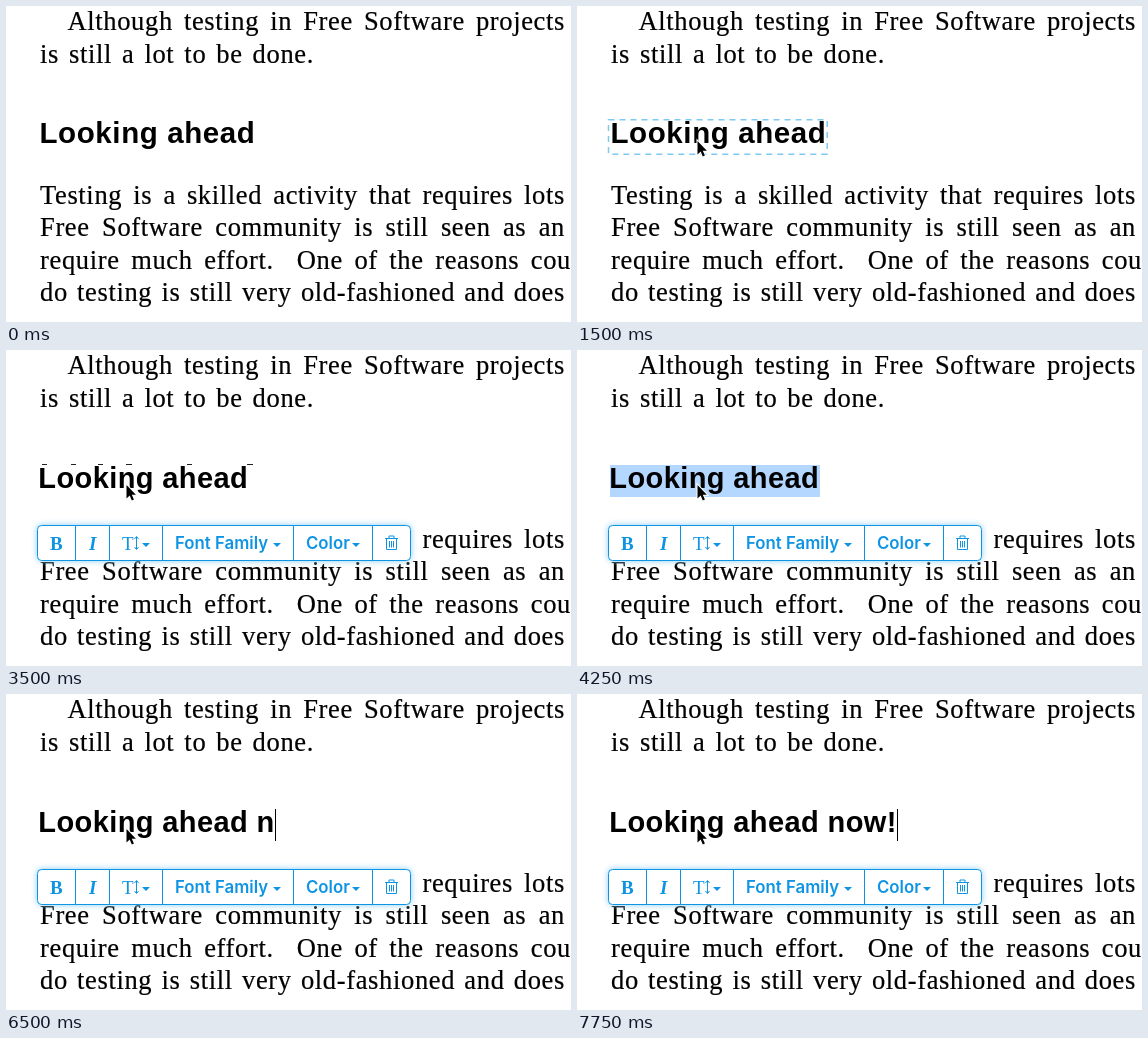
An HTML page for the animation above (8 s loop, 565x316 px).

```html
<!DOCTYPE html>
<html lang="en">
<head>
<meta charset="utf-8">
<title>Editing a heading</title>
<style>
  html, body { margin: 0; width: 100%; height: 100%; overflow: hidden; background: #fff; }
  .body, .head, svg { position: absolute; }
  .body { left: 34px; font: 26.5px/32.3px "Liberation Serif", serif; letter-spacing: .65px;
    word-spacing: -2px; -webkit-text-stroke: .2px; }
  .body p { margin: 0; height: 32.3px; width: 525px; text-align-last: justify; }
  .head { white-space: pre; font: bold 29.5px/27px "Liberation Sans", sans-serif; letter-spacing: .6px; }
  #edited { left: 33px; top: 115px; height: 32px; padding-right: 1px; font-size: 29px; letter-spacing: .4px; }
  #typed { margin-left: -.7px; }
  svg { left: 0; top: 0; }
  .bar { fill: #0e94e3; font: 600 16.8px Inter, sans-serif; }
  .serif { font: bold 19px "Liberation Serif", serif; }
  .line { fill: none; stroke: #0e94e3; }
  .panel { fill: #fff; stroke: #0e94e3; filter: drop-shadow(0 0 3px #8ccdf4); }
</style>
</head>
<body>
<div class="body" style="top:-.6px">
  <p style="text-indent:27.5px">Although testing in Free Software projects</p>
  <p style="width:274px">is still a lot to be done.</p>
</div>
<div class="body" style="top:173.2px">
  <p>Testing is a skilled activity that requires lots</p>
  <p>Free Software community is still seen as an</p>
  <p style="width:531px">require much effort.&nbsp; One of the reasons cou</p>
  <p>do testing is still very old-fashioned and does</p>
</div>

<div id="heading" class="head" style="left:33.5px; top:113px">Looking ahead</div>
<div id="edited" class="head"><span id="typed"></span></div>

<svg width="565" height="316" viewBox="0 0 565 316">
  <path id="hover" d="M31.5 113.8H250.2V148.2H31.5Z" fill="none" stroke="#7ccaf2" stroke-width="1.5" stroke-dasharray="6 5"/>
  <path id="specks" d="M36 114.5h5M65 114.5h5M92 114.5h5M120 114.5h6M181 114.5h5M241 114.5h6" stroke="#222"/>

  <g id="toolbar" class="bar">
    <rect class="panel" x="31.5" y="175.5" width="373" height="35" rx="4"/>
    <path class="line" d="M69.5 176v34M103.5 176v34M156.5 176v34M287.5 176v34M366.5 176v34"/>
    <text class="serif" x="44" y="200">B</text>
    <text class="serif" x="83" y="200" style="font-style:italic">I</text>
    <text class="serif" x="116" y="200" style="font-weight:400">T</text>
    <path class="line" d="M130.5 187v12M128.5 189l2-2.5 2 2.5M128.5 197l2 2.5 2-2.5"/>
    <text x="169" y="199">Font Family</text>
    <text x="300" y="199">Color</text>
    <path d="M136 193h8l-4 4zM267 193h8l-4 4zM346 193h8l-4 4z"/>
    <path class="line" d="M379 188.5h13M383 188v-2h5v2M380.5 189v10.5h10V189M383.5 191v6.5M385.5 191v6.5M387.5 191v6.5"/>
  </g>

  <path id="cursor" d="M0 0V13.5L3.2 10.6 5.3 15.4 7.4 14.5 5.3 9.8H9.4Z" stroke="#fff" paint-order="stroke" stroke-width="2"/>
</svg>
<script>
const $ = id => document.getElementById(id);
const LOOP = 8000, OPEN = 2000, SELECT = 4000, DESELECT = 5500, BLINK = 500;

// Pointer stops: [time, x, y]
const stops = [[250, 370, 68], [500, 218, 104], [750, 182, 126], [1250, 132, 134], [1500, 120.5, 135]];
// Each action restarts the caret's blinking and may add text
const actions = [[OPEN, "Looking ahead"], [DESELECT, ""], [6500, " n"], [6750, "o"], [7000, "w"], [7750, "!"]];

const show = (id, on) => $(id).style.display = on ? "" : "none";

function draw(now) {
  const t = now % LOOP;
  const past = list => list.filter(([start]) => start <= t);
  const open = t >= OPEN, selected = t >= SELECT && t < DESELECT;

  show("heading", !open);
  show("hover", t >= 1250 && !open);
  show("specks", open && t < 4250);
  show("edited", open);
  show("toolbar", open);

  const done = past(actions);
  $("typed").textContent = done.map(([, text]) => text).join("");
  if (open) {
    const caretOn = !selected && Math.floor((t - done.at(-1)[0]) / BLINK) % 2 === 0;
    const side = t < SELECT ? 1 : -1;
    $("edited").style.boxShadow = caretOn ? `inset ${side}px 0 #000` : "none";
    $("edited").style.background = selected ? "#b3d7ff" : "none";
  }

  const stop = past(stops).at(-1);
  show("cursor", stop);
  if (stop) $("cursor").setAttribute("transform", `translate(${stop[1]} ${stop[2]})`);
  requestAnimationFrame(draw);
}
draw(performance.now());
</script>
</body>
</html>
```
